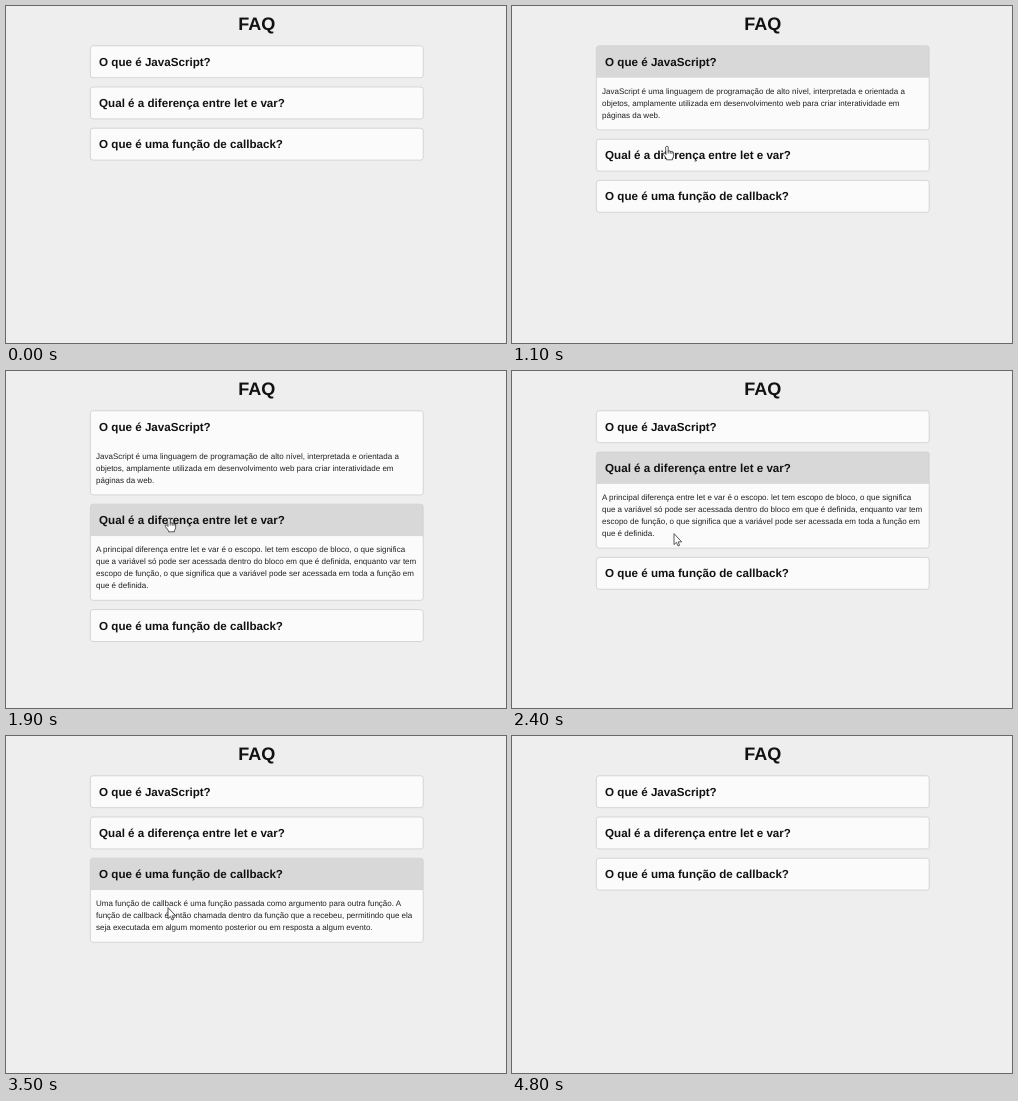
An HTML page that plays this animation: 500 px wide and 337 px high, repeating every 5400 ms.

```html
<!DOCTYPE html>
<html lang="pt">
<head>
<meta charset="utf-8">
<title>FAQ</title>
<style>
  html, body { margin: 0; width: 100%; height: 100%; overflow: hidden; background: #eee; }
  svg { display: block; width: 100vw; height: 100vh; }
  text { font-family: "Liberation Sans", Arial, sans-serif; fill: #111; text-rendering: geometricPrecision; }
  .title { font-size: 18.06px; font-weight: bold; text-anchor: middle; }
  .question { font-size: 11.61px; font-weight: bold; }
  .answer { font-size: 8px; fill: #222; }
  .box { fill: #fbfbfb; }
  .header { fill: #d9d8d9; }
  .border { fill: none; stroke: #cfcfcf; stroke-width: .8; }
  .cursor path { fill: #fff; stroke: #333; stroke-width: .8; stroke-linejoin: round; stroke-linecap: round; }
</style>
</head>
<body>
<svg id="stage" viewBox="0 0 500 337" preserveAspectRatio="none">
  <rect width="500" height="337" fill="#eee"/>
  <text class="title" x="250.7" y="23.8">FAQ</text>
</svg>
<script>
const LOOP = 5400, STEP = 100;
const LEFT = 84.4, WIDTH = 332.8, TOP = 39.8, HEADER = 31.9, GAP = 9.3;
const LINE = 12, PADDING = 16.2, MAX_HEIGHT = 200, DURATION = 500;

const faq = [
  { question: 'O que é JavaScript?', open: 405, close: 1706, answer: [
    'JavaScript é uma linguagem de programação de alto nível, interpretada e orientada a',
    'objetos, amplamente utilizada em desenvolvimento web para criar interatividade em',
    'páginas da web.'] },
  { question: 'Qual é a diferença entre let e var?', open: 1706, close: 2900, answer: [
    'A principal diferença entre let e var é o escopo. let tem escopo de bloco, o que significa',
    'que a variável só pode ser acessada dentro do bloco em que é definida, enquanto var tem',
    'escopo de função, o que significa que a variável pode ser acessada em toda a função em',
    'que é definida.'] },
  { question: 'O que é uma função de callback?', open: 2900, close: 4110, answer: [
    'Uma função de callback é uma função passada como argumento para outra função. A',
    'função de callback é então chamada dentro da função que a recebeu, permitindo que ela',
    'seja executada em algum momento posterior ou em resposta a algum evento.'] }
];

// Pointer path: time, x, y
const track = [
  [100, 185, 84], [200, 113, 58], [1000, 113, 58], [1100, 155, 140], [1500, 163, 147],
  [2200, 163, 147], [2400, 162, 163], [2700, 162, 197], [3200, 162, 197], [3500, 162, 172],
  [4000, 165, 137], [4500, 165, 137], [4700, 252, 26], [4800, 252, 26]
];

const stage = document.getElementById('stage');

function add(parent, tag, attrs, content) {
  const node = document.createElementNS('http://www.w3.org/2000/svg', tag);
  for (const key in attrs) node.setAttribute(key, attrs[key]);
  if (content) node.textContent = content;
  parent.appendChild(node);
  return node;
}

function buildItem(item, i) {
  const frame = { x: LEFT, width: WIDTH, rx: 2.6 };
  item.group = add(stage, 'g', {});
  const clip = add(item.group, 'clipPath', { id: 'clip' + i });
  const body = add(item.group, 'g', { 'clip-path': `url(#clip${i})` });
  const box = add(body, 'rect', { ...frame, class: 'box' });
  item.header = add(body, 'rect', { x: LEFT, width: WIDTH, height: HEADER, class: 'header' });
  add(body, 'text', { x: 93.1, y: 20.1, class: 'question' }, item.question);
  const panel = add(body, 'g', {});
  item.answer.forEach((line, n) =>
    add(panel, 'text', { x: 90, y: HEADER + PADDING + n * LINE, class: 'answer' }, line));
  item.panel = panel;
  item.frames = [add(clip, 'rect', frame), box, add(item.group, 'rect', { ...frame, class: 'border' })];
  item.full = 16.2 + LINE * item.answer.length;
}
faq.forEach(buildItem);

const cursor = add(stage, 'g', { class: 'cursor' });
const hand = add(cursor, 'path', { d:
  'M-1.2 .8Q0 -.6 1.2 .8V5.2Q2.4 4.2 3.2 5.4Q4.5 4.6 5 5.9Q6.5 5.4 6.6 7V9.8Q6.4 11.5 5.5 12.2V13.8H-.6V12.6' +
  'L-3.6 8.4Q-4.3 7 -3 6.8Q-2.1 6.9 -1.2 8.2Z M1.2 5.2V7.2M3.2 5.4V7.3M5 5.9V7.5' });
const arrow = add(cursor, 'path', { d: 'M0 0V10.6L2.4 8.4L4 12L5.6 11.3L4.1 7.9H7.3Z' });

// CSS "ease": cubic-bezier(.25, .1, .25, 1)
function ease(x) {
  if (x <= 0) return 0;
  if (x >= 1) return 1;
  const curve = (s, a, b) => 3 * s * (1 - s) * (1 - s) * a + 3 * s * s * (1 - s) * b + s * s * s;
  let low = 0, high = 1;
  for (let i = 0; i < 30; i++) {
    const mid = (low + high) / 2;
    if (curve(mid, .25, .25) < x) low = mid; else high = mid;
  }
  return curve(low, .1, 1);
}

function panelHeight(item, t) {
  const amount = ease((t - item.open) / DURATION) - ease((t - item.close) / DURATION);
  return Math.min(item.full, MAX_HEIGHT * amount);
}

function pointerAt(t) {
  const next = track.findIndex(point => point[0] > t);
  if (next < 1) return null;
  const [t0, x0, y0] = track[next - 1], [t1, x1, y1] = track[next];
  const k = (t - t0) / (t1 - t0);
  return { x: x0 + (x1 - x0) * k, y: y0 + (y1 - y0) * k };
}

const show = (node, on) => node.setAttribute('visibility', on ? 'visible' : 'hidden');

function draw(t) {
  const pointer = pointerAt(t);
  let y = TOP, overHeader = false;
  for (const item of faq) {
    const open = panelHeight(item, t), height = HEADER + open;
    item.group.setAttribute('transform', `translate(0 ${y})`);
    item.frames.forEach(rect => rect.setAttribute('height', height));
    show(item.header, t >= item.open && t < item.close);
    show(item.panel, open > 0);
    if (pointer && pointer.y >= y && pointer.y <= y + HEADER) overHeader = true;
    y += height + GAP;
  }
  show(hand, pointer && overHeader);
  show(arrow, pointer && !overHeader);
  if (pointer) cursor.setAttribute('transform', `translate(${pointer.x} ${pointer.y})`);
}

const start = performance.now();
function tick() {
  const t = (performance.now() - start) % LOOP;
  draw(Math.floor(t / STEP) * STEP);
  requestAnimationFrame(tick);
}
tick();
</script>
</body>
</html>
```
